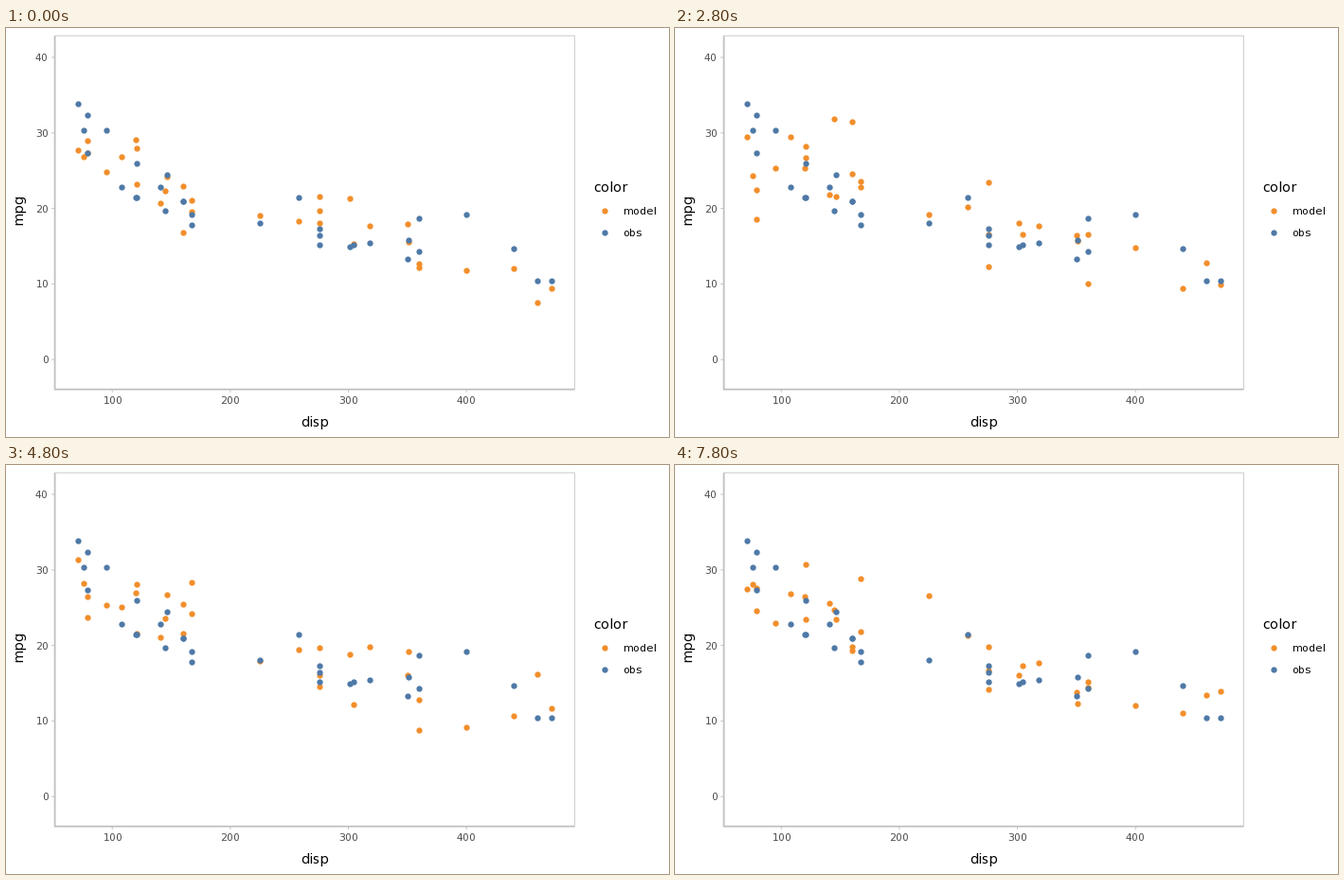
These frames come from a looping animation (700x432 px, 8000 ms). A matplotlib script:

```python
import matplotlib.pyplot as plt
import numpy as np
from matplotlib.animation import FuncAnimation

W, H, DPI = 700, 432, 100
PX = 72 / DPI
FRAMES, INTERVAL = 40, 200
ORANGE, BLUE = "#f28e2b", "#4e79a7"
LABEL, LINE, AXIS = "#4d4d4d", "#cfcfcf", "#c0c0c0"
LEFT, RIGHT, TOP, BOTTOM = 51.6, 600.4, 8.2, 381.7
SMALL, LARGE = 8, 10

plt.rcParams.update({
    "font.family": "DejaVu Sans",
    "text.hinting": "force_autohint",
    "text.hinting_factor": 1,
})

# mtcars, ordered by displacement
DISP = np.array([
    71.1, 75.7, 78.7, 79, 95.1, 108, 120.1, 120.3, 121, 140.8, 145,
    146.7, 160, 160, 167.6, 167.6, 225, 258, 275.8, 275.8, 275.8, 301,
    304, 318, 350, 351, 360, 360, 400, 440, 460, 472])
MPG = np.array([
    33.9, 30.4, 32.4, 27.3, 30.4, 22.8, 21.5, 26, 21.4, 22.8, 19.7,
    24.4, 21, 21, 19.2, 17.8, 18.1, 21.4, 16.4, 17.3, 15.2, 15,
    15.2, 15.5, 13.3, 15.8, 18.7, 14.3, 19.2, 14.7, 10.4, 10.4])


def to_x(disp):
    return 112.2 + (disp - 100) * 1.2467


def to_y(mpg):
    return 350.2 - mpg * 7.98


def model(i):
    """One predictive draw per frame: linear trend plus residual noise."""
    rng = np.random.default_rng(i)
    draw = 30.5 - 0.0435 * DISP + rng.normal(0, 2.9, DISP.size)
    return np.clip(draw, 3.6, 34.6)


def line(xs, ys, color, width):
    ax.plot(xs, ys, color=color, lw=width * PX, snap=False,
            solid_capstyle="butt", solid_joinstyle="miter")


def label(x, y, s, size=SMALL, color="black", ha="left", **kw):
    ax.text(x, y, s, fontsize=size, color=color, ha=ha, va="baseline", **kw)


def dots(x, y, color, z):
    return ax.scatter(x, y, s=(6.3 * PX) ** 2, c=color, linewidths=0, zorder=z)


fig = plt.figure(figsize=(W / DPI, H / DPI), dpi=DPI, facecolor="white")
ax = fig.add_axes([0, 0, 1, 1])
ax.set_axis_off()

line([LEFT, RIGHT, RIGHT], [TOP, TOP, BOTTOM], LINE, 1.1)
line([LEFT, LEFT, RIGHT], [TOP, BOTTOM, BOTTOM], AXIS, 1.8)

for disp in range(100, 500, 100):
    x = to_x(disp)
    line([x, x], [BOTTOM, BOTTOM + 3.5], AXIS, 0.9)
    label(x, 397.4, str(disp), color=LABEL, ha="center")
for mpg in range(0, 50, 10):
    y = to_y(mpg)
    line([LEFT - 3.5, LEFT], [y, y], AXIS, 0.9)
    label(45, y + 4, str(mpg), color=LABEL, ha="right")

label(326, 421, "disp", LARGE, ha="center")
label(17.5, 192, "mpg", LARGE, ha="center", rotation=90,
      rotation_mode="anchor")

label(620.3, 173, "color", LARGE)
for y, name, color in ((193, "model", ORANGE), (216, "obs", BLUE)):
    dots([632], [y], color, 3)
    label(651, y + 4, name)

xs = to_x(DISP)
pred = dots(xs, to_y(model(0)), ORANGE, 3)
dots(xs, to_y(MPG), BLUE, 4)

ax.set_xlim(0, W)
ax.set_ylim(H, 0)


def update(i):
    pred.set_offsets(np.column_stack([xs, to_y(model(i))]))
    return [pred]


anim = FuncAnimation(fig, update, frames=FRAMES, interval=INTERVAL,
                     repeat=True, repeat_delay=0)
plt.show()
```
